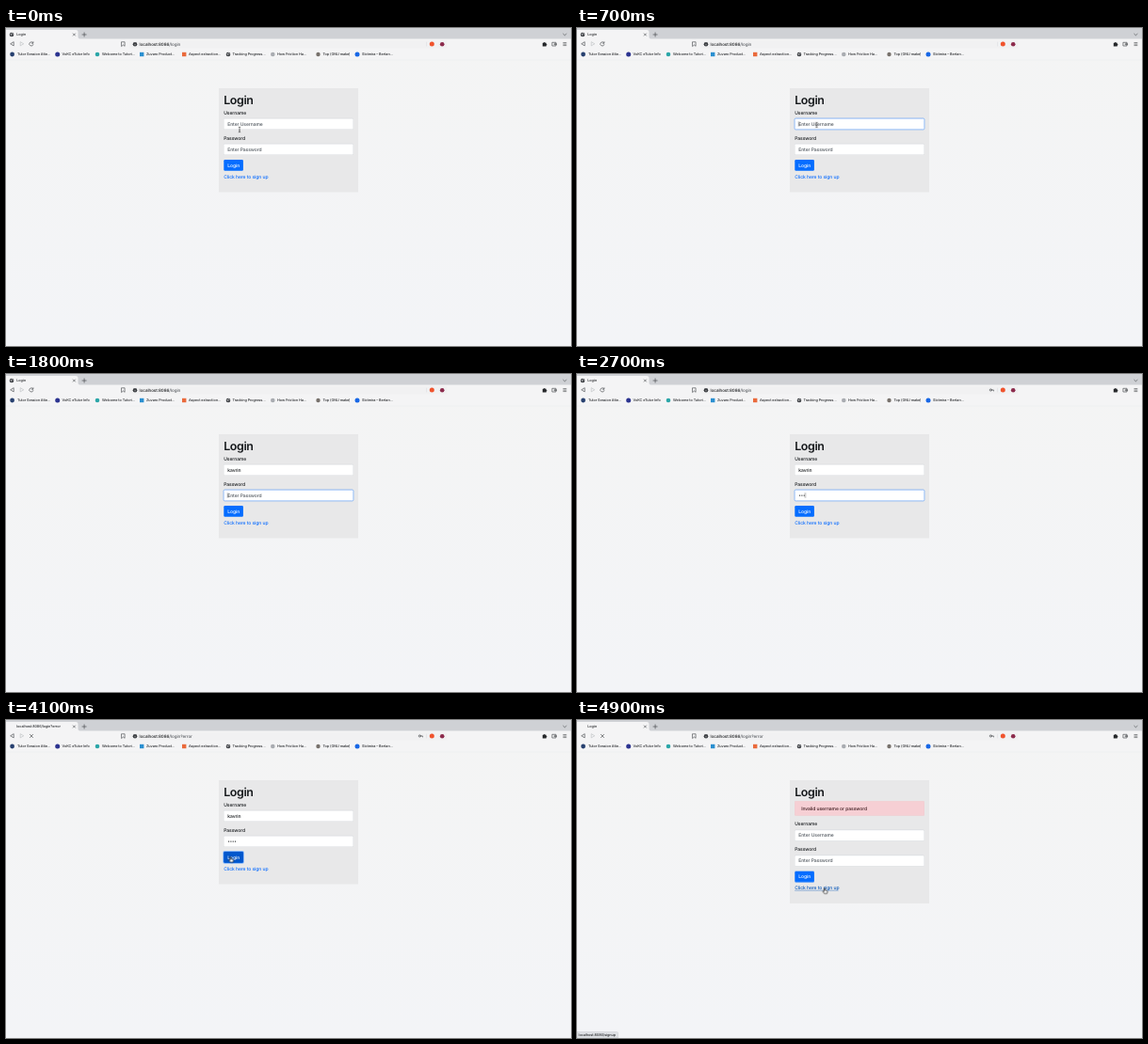
These frames come from a looping animation (600 px wide and 338 px high, 5000 ms). An HTML page:

```html
<!DOCTYPE html>
<html lang="en">
<head>
<meta charset="utf-8">
<title>Login</title>
<style>
html, body { margin: 0; width: 100%; height: 100%; overflow: hidden; background: #f4f4f5; }
svg { display: block; width: 100vw; height: 100vh; }
text { font-family: Inter, "Open Sans", sans-serif; font-size: 5px; font-weight: 450; fill: #15181b; text-rendering: geometricPrecision; letter-spacing: -.07px; white-space: pre; }
.h1 { font-size: 12.4px; font-weight: 560; letter-spacing: -.36px; }
.ph { fill: #50575e; }
.white { fill: #fff; }
.link { fill: #0a6cff; animation-name: link; }
.tab { font-size: 3.8px; fill: #26282b; }
.url { font-size: 4.55px; fill: #1a1c1e; }
.url .path { fill: #54585d; }
.marks text { font-size: 3.8px; fill: #26282b; }
.field { fill: #fff; stroke: #cbd0d5; stroke-width: .4; }
.ring { fill: #fff; stroke: #6ba3f8; stroke-width: .55; }
.glow { fill: #007bff; opacity: .18; }
.line { fill: none; stroke: #3a3d41; stroke-width: .6; stroke-linecap: round; stroke-linejoin: round; }
.dim { stroke: #b9bcc0; }

/* the whole picture advances in 100 ms steps: 2% each */
.a { animation-duration: 5s; animation-timing-function: step-end; animation-iteration-count: infinite; }
.shift { animation-name: shift; }
.err { animation-name: err; }
.filled { animation-name: filled; }
.ph1 { animation-name: ph1; }
.ph2 { animation-name: ph2; }
.focus1 { animation-name: focus1; }
.focus2 { animation-name: focus2; }
.press { animation-name: press; }
.hover { animation-name: hover; }
.caret { animation-name: caret; }
.key { animation-name: key; }
.load { animation-name: load; }
.idle { animation-name: idle; }
.wait { animation-name: wait; }
.title { animation-name: title; }
.query { animation-name: query; }
.over { animation-name: over; }
.pos { animation-name: pos; }
.beam { animation-name: beam; }
.arrow { animation-name: arrow; }
.hand { animation-name: hand; }
/* --s is the second at which a character appears */
.char { animation: char 5s step-end calc(var(--s) * 1s - 5s) infinite; }
.dot { animation: dot 5s step-end calc(var(--s) * 1s - 5s) infinite; }

@keyframes char { 0% { visibility: visible } 64%, 100% { visibility: hidden } }
@keyframes dot { 0% { visibility: visible } 40%, 100% { visibility: hidden } }
@keyframes shift { 0% { transform: none } 84%, 100% { transform: translateY(20.7px) } }
@keyframes err { 0% { opacity: 0 } 84%, 100% { opacity: 1 } }
@keyframes filled { 0% { opacity: 1 } 84%, 100% { opacity: 0 } }
@keyframes ph1 { 0% { opacity: 1 } 20% { opacity: 0 } 84%, 100% { opacity: 1 } }
@keyframes ph2 { 0% { opacity: 1 } 46% { opacity: 0 } 84%, 100% { opacity: 1 } }
@keyframes focus1 { 0% { opacity: 0 } 12% { opacity: .6 } 14% { opacity: 1 } 34% { opacity: .4 } 36%, 100% { opacity: 0 } }
@keyframes focus2 { 0% { opacity: 0 } 34% { opacity: .6 } 36% { opacity: 1 } 80%, 100% { opacity: 0 } }
@keyframes hover { 0% { opacity: 0 } 76% { opacity: .6 } 78% { opacity: 1 } 84%, 100% { opacity: 0 } }
@keyframes press { 0% { opacity: 0 } 80% { opacity: 1 } 84%, 100% { opacity: 0 } }
@keyframes key { 0% { opacity: 0 } 46%, 100% { opacity: 1 } }
@keyframes load { 0% { opacity: 0 } 80% { opacity: 1 } 84% { opacity: 0 } 98%, 100% { opacity: 1 } }
@keyframes idle { 0% { opacity: 1 } 80% { opacity: 0 } 84% { opacity: 1 } 98%, 100% { opacity: 0 } }
@keyframes wait { 0% { opacity: 1 } 82% { opacity: 0 } 84%, 100% { opacity: 1 } }
@keyframes title { 0% { opacity: 0 } 82% { opacity: 1 } 84%, 100% { opacity: 0 } }
@keyframes query { 0% { visibility: hidden } 82%, 100% { visibility: visible } }
@keyframes link { 0% { fill: #0a6cff } 94%, 100% { fill: #0756b8 } }
@keyframes over { 0% { opacity: 0 } 94%, 100% { opacity: 1 } }
@keyframes caret {
  0% { opacity: 0; transform: translate(235.6px, 102px) }
  12% { opacity: 1; transform: translate(235.6px, 102px) }
  20% { opacity: 1; transform: translate(238.1px, 102px) }
  22% { opacity: 1; transform: translate(240.9px, 102px) }
  24% { opacity: 1; transform: translate(243.7px, 102px) }
  26% { opacity: 1; transform: translate(245.6px, 102px) }
  28% { opacity: 1; transform: translate(246.9px, 102px) }
  30% { opacity: 1; transform: translate(249.9px, 102px) }
  34% { opacity: 1; transform: translate(235.6px, 129px) }
  46% { opacity: 1; transform: translate(238px, 129px) }
  50% { opacity: 1; transform: translate(240.2px, 129px) }
  54% { opacity: 1; transform: translate(242.4px, 129px) }
  58% { opacity: 1; transform: translate(244.5px, 129px) }
  64%, 100% { opacity: 0; transform: translate(244.5px, 129px) }
}
@keyframes pos {
  0% { transform: translate(248px, 108px) }
  2% { transform: translate(248px, 106px) }
  4% { transform: translate(248px, 103.2px) }
  8% { transform: translate(250px, 103px) }
  10% { transform: translate(252.5px, 103px) }
  12% { transform: translate(254.5px, 103px) }
  68% { transform: translate(250px, 104px) }
  70% { transform: translate(229px, 119px) }
  72% { transform: translate(221.6px, 128.6px) }
  74% { transform: translate(226px, 137px) }
  76% { transform: translate(234px, 144px) }
  78% { transform: translate(238.4px, 145.4px) }
  88% { transform: translate(240px, 150px) }
  90% { transform: translate(246px, 160px) }
  92% { transform: translate(252px, 169px) }
  94% { transform: translate(259px, 176.5px) }
  96%, 100% { transform: translate(262.8px, 178.6px) }
}
@keyframes beam { 0% { opacity: 1 } 20% { opacity: 0 } 68% { opacity: 1 } 70% { opacity: 0 } 88% { opacity: 1 } 92%, 100% { opacity: 0 } }
@keyframes arrow { 0% { opacity: 0 } 70% { opacity: 1 } 76% { opacity: 0 } 92% { opacity: 1 } 94%, 100% { opacity: 0 } }
@keyframes hand { 0% { opacity: 0 } 76% { opacity: 1 } 88% { opacity: 0 } 94%, 100% { opacity: 1 } }
</style>
</head>
<body>
<svg viewBox="0 0 600 338" preserveAspectRatio="none">
  <defs>
    <linearGradient id="page" x2="0" y2="1">
      <stop stop-color="#f4f4f4"/><stop offset="1" stop-color="#f3f4f7"/>
    </linearGradient>
    <g id="globe">
      <circle r="2.3" fill="#3a3d41"/>
      <path d="M-1.6-.9L0-.3L-.4 1.2M.4-1.7L1.5-.3" fill="none" stroke="#f4f4f4" stroke-width=".6"/>
    </g>
  </defs>

  <!-- browser -->
  <rect width="600" height="338" fill="url(#page)"/>
  <rect width="600" height="12" fill="#cfd1d5"/>
  <path d="M0 2H74Q76.500 2 76.500 4.500V9.500Q76.500 11.500 78.500 11.500H600V34H0Z" fill="#f4f4f5"/>
  <path d="M0 34H600" stroke="#e6e7e9" stroke-width=".4"/>
  <use href="#globe" x="6" y="7" class="a idle"/>
  <text x="11.200" y="8.400" class="tab a wait">Login</text>
  <text x="11.200" y="8.400" class="tab a title">localhost:8086/login?error</text>
  <path class="line" d="M71.300 5.900l2.200 2.200m0-2.200l-2.200 2.200M81 7h4.200M83.100 4.900v4.200M591.800 6.300l1.600 1.500l1.600-1.500"/>

  <path class="line" d="M8.200 15.100V18.900L5 17Z"/>
  <path class="line dim" d="M15.200 15.100V18.900L18.400 17Z"/>
  <path class="line a idle" d="M28.600 15.700A2.100 2.100 0 1 0 28.900 17.600M28.900 14.700v1.500h-1.500"/>
  <path class="line a load" d="M25.400 15.400l3.200 3.200m0-3.200l-3.200 3.200"/>
  <path class="line" d="M122.900 14.800h3.200v4.500l-1.600-1.300l-1.600 1.300Z"/>
  <rect x="131" y="13" width="337.500" height="8.600" rx="1.200" fill="#f1f1f2"/>
  <circle cx="137" cy="17.200" r="2.300" fill="#3a3d41"/>
  <path d="M137 16.900v1.400M137 15.700v.3" stroke="#f4f4f4" stroke-width=".6"/>
  <text x="141.600" y="18.800" class="url">localhost:8086<tspan class="path">/login</tspan><tspan class="path a query">?error</tspan></text>
  <g class="a key">
    <circle cx="439.300" cy="17" r="1.100" class="line"/>
    <path class="line" d="M440.400 17h2.200v1"/>
  </g>
  <path d="M446.500 14.800v4.600" stroke="#d2d4d8" stroke-width=".4"/>
  <circle cx="452.300" cy="17" r="2.500" fill="#f0532d"/>
  <circle cx="463.200" cy="17.200" r="2.300" fill="#8c2b4c"/>
  <path d="M569.800 15.800h1.200a.8.800 0 0 1 1.600 0h1.100v1.100a.8.800 0 0 1 0 1.600v1h-3.900Z" fill="#26282b"/>
  <path class="line" d="M580.300 15.300h3.700v3.700h-3.700ZM582.600 16.700h2v1h-2Z"/>
  <path class="line" d="M591.900 15.600h3M591.900 17.100h3M591.900 18.600h3"/>

  <g class="marks">
    <circle cx="6.600" cy="28" r="2.400" fill="#27406f"/><text x="12" y="29.300">Tutor Session Atte...</text>
    <circle cx="54.700" cy="28" r="2.500" fill="#2b3390"/><text x="59.500" y="29.300">VoKC eTutor Info</text>
    <circle cx="97" cy="28" r="2.300" fill="#2ba6a8"/><text x="102" y="29.300">Welcome to Tutori...</text>
    <rect x="142" y="25.800" width="4.400" height="4.400" fill="#2a8fd0"/><text x="149" y="29.300">Zuvaro Product...</text>
    <rect x="187" y="25.800" width="4.400" height="4.400" fill="#ea6a3c"/><text x="194" y="29.300">Aspect extraction...</text>
    <use href="#globe" x="236" y="28"/><text x="240.500" y="29.300">Tracking Progress...</text>
    <circle cx="283.300" cy="28" r="2.300" fill="#a9acb1"/><text x="288" y="29.300">How Friction Ha...</text>
    <circle cx="331.500" cy="28" r="2.200" fill="#77716c"/><text x="336.500" y="29.300">Top (GNU make)</text>
    <circle cx="373" cy="28" r="2.500" fill="#1767e6"/><text x="378" y="29.300">Slotmira – Bertan...</text>
  </g>

  <!-- form -->
  <rect x="226" y="64" width="148" height="110.500" fill="#e8e8e9"/>
  <rect x="226" y="174" width="148" height="21" fill="#e8e8e9" class="a err"/>
  <text x="231.200" y="81" class="h1">Login</text>
  <g class="a err">
    <rect x="231.200" y="86.200" width="137.600" height="15.400" rx="1.200" fill="#f6cfd4" stroke="#f0c2c8" stroke-width=".4"/>
    <text x="238.200" y="95.800" style="fill:#3d1a1e">Invalid username or password</text>
  </g>

  <g class="a shift">
    <text x="231.200" y="91.700">Username</text>
    <rect class="field" x="231.200" y="96.200" width="137.600" height="11.600" rx="1.200"/>
    <g class="a focus1">
      <rect class="glow" x="230.500" y="95.500" width="139" height="13" rx="1.700"/>
      <rect class="ring" x="231.200" y="96.200" width="137.600" height="11.600" rx="1.200"/>
    </g>
    <text x="235.200" y="103.800" class="ph a ph1">Enter Username</text>
    <g class="a filled">
      <text x="235.200" y="103.800"><tspan class="char" style="--s:1">k</tspan><tspan class="char" style="--s:1.1">a</tspan><tspan class="char" style="--s:1.2">v</tspan><tspan class="char" style="--s:1.3">r</tspan><tspan class="char" style="--s:1.4">i</tspan><tspan class="char" style="--s:1.5">n</tspan></text>
    </g>

    <text x="231.200" y="118.700">Password</text>
    <rect class="field" x="231.200" y="123.200" width="137.600" height="11.600" rx="1.200"/>
    <g class="a focus2">
      <rect class="glow" x="230.500" y="122.500" width="139" height="13" rx="1.700"/>
      <rect class="ring" x="231.200" y="123.200" width="137.600" height="11.600" rx="1.200"/>
    </g>
    <text x="235.200" y="130.800" class="ph a ph2">Enter Password</text>
    <g class="a filled" fill="#15181b">
      <circle class="dot" style="--s:2.3" cx="236.600" cy="129.100" r=".65"/>
      <circle class="dot" style="--s:2.5" cx="238.900" cy="129.100" r=".65"/>
      <circle class="dot" style="--s:2.7" cx="241.200" cy="129.100" r=".65"/>
      <circle class="dot" style="--s:2.9" cx="243.500" cy="129.100" r=".65"/>
    </g>

    <rect class="a press" x="230.300" y="139" width="22.600" height="13.800" rx="2" fill="#84b5f7"/>
    <rect x="231.300" y="140" width="20.600" height="11.800" rx="1.200" fill="#056dff"/>
    <rect class="a hover" x="231.300" y="140" width="20.600" height="11.800" rx="1.200" fill="#0057cc"/>
    <text x="235.300" y="147.800" class="white">Login</text>
    <text x="231.200" y="159.800" class="a link">Click here to sign up</text>
    <path class="a over" d="M231.200 160.500H277.700" stroke="#0756b8" stroke-width=".4"/>
  </g>
  <path class="a caret" d="M0-2.800V2.800" stroke="#111" stroke-width=".4"/>

  <g class="a over">
    <path d="M0 331.500H42.300Q43.600 331.500 43.600 332.800V338H0Z" fill="#dfe1e5" stroke="#c3c6cb" stroke-width=".4"/>
    <text x="1.500" y="336.200" class="tab">localhost:8086/signup</text>
  </g>

  <!-- pointer -->
  <g class="a pos">
    <path class="a beam" d="M-1.200-2.800Q0-2.800 0-2Q0-2.800 1.200-2.800M0-2V2M-1.200 2.800Q0 2.800 0 2Q0 2.800 1.200 2.800M-.6.8H.6" fill="none" stroke="#222" stroke-width=".55"/>
    <path class="a arrow" d="M0 0V4.400L1 3.500L1.700 5L2.400 4.700L1.700 3.200H3.100Z" fill="#000" stroke="#fff" stroke-width=".35"/>
    <path class="a hand" d="M-.5.3Q0-.3.500.3V2.300L2.800 2.900Q3.300 3.100 3.200 3.700L2.700 5.800H-.2L-1.800 3.700Q-1.900 3-1.100 3.100L-.5 3.600Z" fill="#fff" stroke="#000" stroke-width=".6"/>
  </g>
</svg>
</body>
</html>
```
